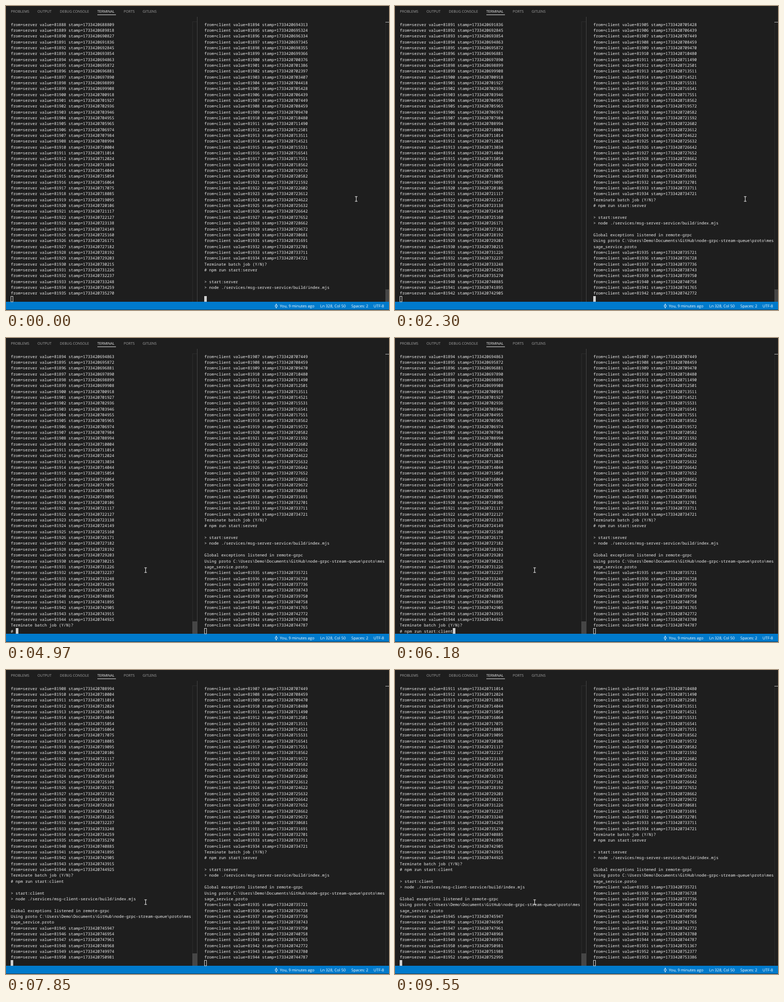
An HTML page with a canvas for the animation above (9.58 s loop, 742x590 px).

```html
<!DOCTYPE html>
<html lang="en">
<head>
<meta charset="utf-8">
<title>Split terminal</title>
<style>
  html, body { margin: 0; width: 100%; height: 100%; overflow: hidden; background: #1e1e1e; }
  canvas { display: block; }
</style>
</head>
<body>
<canvas id="stage" width="742" height="590"></canvas>
<script>
const ctx = document.getElementById('stage').getContext('2d');
const LOOP = 9580;
const ROWS = 48, ROW_H = 11.34, FIRST_BASE = 38.6, CELL = 4.668;
const MONO = '500 7.78px "Noto Sans Mono", monospace';
const TAB = '6.9px "Open Sans", sans-serif';
const STATUS = '7.6px "Open Sans", sans-serif';
const FG = '#f0f0f0';

const SPEED = 1.45, CLOCK_START = 739660;
const playTime = stamp => (stamp - CLOCK_START) / SPEED;

const at = (time, ...texts) => texts.map(text => ({ time, text }));

// A one-second timer that drifts from the first stamp to the last, bowed in between.
// The counter follows whole seconds; queued messages wait for the flush.
function messages(from, first, last, { flush = -Infinity, bow = 0 } = {}) {
  const steps = Math.floor((last - first) / 1000);
  return Array.from({ length: steps + 1 }, (_, i) => {
    const p = i / steps;
    const stamp = Math.round(first + (last - first) * p + bow * Math.sin(Math.PI * p));
    const value = 81200 + Math.floor(stamp / 1000);
    return {
      time: Math.max(flush, playTime(stamp)),
      text: `from=${from} value=${value} stamp=1733420${stamp}`
    };
  });
}

const ASK = 'Terminate batch job (Y/N)?';
const command = side => `# npm run start:${side}`;
const banner = side => ['', `> start:${side}`, `> node ./services/msg-${side}-service/build/index.mjs`, ''];
const boot = [
  'Global exceptions listened in remote-grpc',
  'Using proto C:\\Users\\Demo\\Documents\\GitHub\\node-grpc-stream-queue\\proto\\mes',
  'sage_service.proto'
];

const T = {
  serverBoot: 160, serverFlush: 400,
  moveStart: 2750, moveEnd: 3300, click: 3900,
  ask: 4180, prompt: 4710, recall: 5300, enter: 6640,
  banner: 6950, clientBoot: 7380, clientFlush: 7620
};

const left = {
  x: 9.3,
  lines: [
    ...messages('server', 688809, 735270, { bow: -16 }),
    ...messages('server', 740885, 744925),
    ...at(T.prompt, ASK),
    ...at(T.enter, command('client')),
    ...at(T.banner, ...banner('client')),
    ...at(T.clientBoot, ...boot),
    ...messages('server', 745947, 752995, { flush: T.clientFlush })
  ],
  input(t) {
    if (t < T.ask || t >= T.enter) return '';
    if (t < T.prompt) return ASK + ' ';
    return t < T.recall ? '# ' : command('client');
  },
  focused: t => t >= T.click
};

const right = {
  x: 384.3,
  lines: [
    ...messages('client', 694313, 734721, { bow: 4 }),
    ...at(-1, ASK, command('server'), ...banner('server')),
    ...at(T.serverBoot, ...boot),
    ...messages('client', 735721, 744787, { flush: T.serverFlush }),
    ...messages('client', 751367, 753386)
  ],
  input: () => '',
  focused: t => t < T.click
};

const progress = (t, a, b) => Math.min(1, Math.max(0, (t - a) / (b - a)));
const ease = p => p * p * (3 - 2 * p);

function rect(color, x, y, w, h) {
  ctx.fillStyle = color;
  ctx.fillRect(x, y, w, h);
}

function label(text, x, y, font, color) {
  ctx.font = font;
  ctx.fillStyle = color;
  ctx.fillText(text, x, y);
}

function drawPane(pane, t) {
  const input = pane.input(t);
  const shown = pane.lines.filter(l => l.time <= t).slice(1 - ROWS).map(l => l.text);
  [...shown, input].forEach((text, i) => label(text, pane.x, FIRST_BASE + i * ROW_H, MONO, FG));

  const x = Math.round(pane.x + input.length * CELL);
  if (pane.focused(t)) {
    rect('#cfcfcf', x, 563, 5, 11);
  } else {
    ctx.strokeStyle = '#cfcfcf';
    ctx.lineWidth = 1;
    ctx.strokeRect(x + 0.5, 563.5, 4, 10.5);
  }
}

function drawTabs() {
  const tabs = [['PROBLEMS', 9.5], ['OUTPUT', 61], ['DEBUG CONSOLE', 104.3],
    ['TERMINAL', 177], ['PORTS', 228], ['GITLENS', 264.7]];
  for (const [name, x] of tabs) {
    label(name, x, 13.3, TAB, name === 'TERMINAL' ? '#f4f4f4' : '#a4a4a4');
  }
  rect('#e4e4e4', 177, 16.5, 36, 1);
}

function drawFrameLines() {
  rect('#434343', 370, 21, 1, 553);
  for (const [x, w] of [[361, 9], [735, 7]]) {
    rect('#2b2b2b', x, 30, 1, 544);
    rect('#2b2b2b', x, 30, w, 1);
  }
  rect('#a8a8a8', 735, 31, 7, 1);
}

function drawScrollbars(t) {
  const bar = (x, w, alpha) => {
    ctx.globalAlpha = alpha;
    rect('#464646', x, 550, w, 24);
    ctx.globalAlpha = 1;
  };
  bar(361, 9, progress(t, 3080, 3180));
  bar(735, 7, 1 - progress(t, 3650, 4110));
}

function drawStatusBar() {
  rect('#007acc', 0, 574, 742, 15.4);
  ctx.strokeStyle = '#fff';
  ctx.lineWidth = 1;
  ctx.beginPath();
  ctx.arc(523.5, 582.3, 2, 0, 7);
  ctx.moveTo(523.5, 577.8);
  ctx.lineTo(523.5, 580.3);
  ctx.moveTo(523.5, 584.3);
  ctx.lineTo(523.5, 586.8);
  ctx.stroke();
  const items = [['You, 9 minutes ago', 530.5], ['Ln 328, Col 50', 608.7],
    ['Spaces: 2', 669], ['UTF-8', 712]];
  for (const [text, x] of items) label(text, x, 585.2, STATUS, '#fff');
}

function drawPointer(t) {
  const p = ease(progress(t, T.moveStart, T.moveEnd));
  const x = Math.round(678 - 408 * p), y = Math.round(375 + 76 * p) - 0.5;
  rect('#e6e6e6', x, y - 5, 1, 10);
  for (const edge of [y - 5, y + 4]) rect('#e6e6e6', x - 2, edge, 5, 1);
}

function draw(t) {
  rect('#1e1e1e', 0, 0, 742, 590);
  drawTabs();
  drawFrameLines();
  drawScrollbars(t);
  drawStatusBar();
  drawPane(left, t);
  drawPane(right, t);
  drawPointer(t);
}

ctx.textRendering = 'geometricPrecision';
const start = performance.now();
function tick() {
  draw((performance.now() - start) % LOOP);
  requestAnimationFrame(tick);
}
tick();
</script>
</body>
</html>
```
